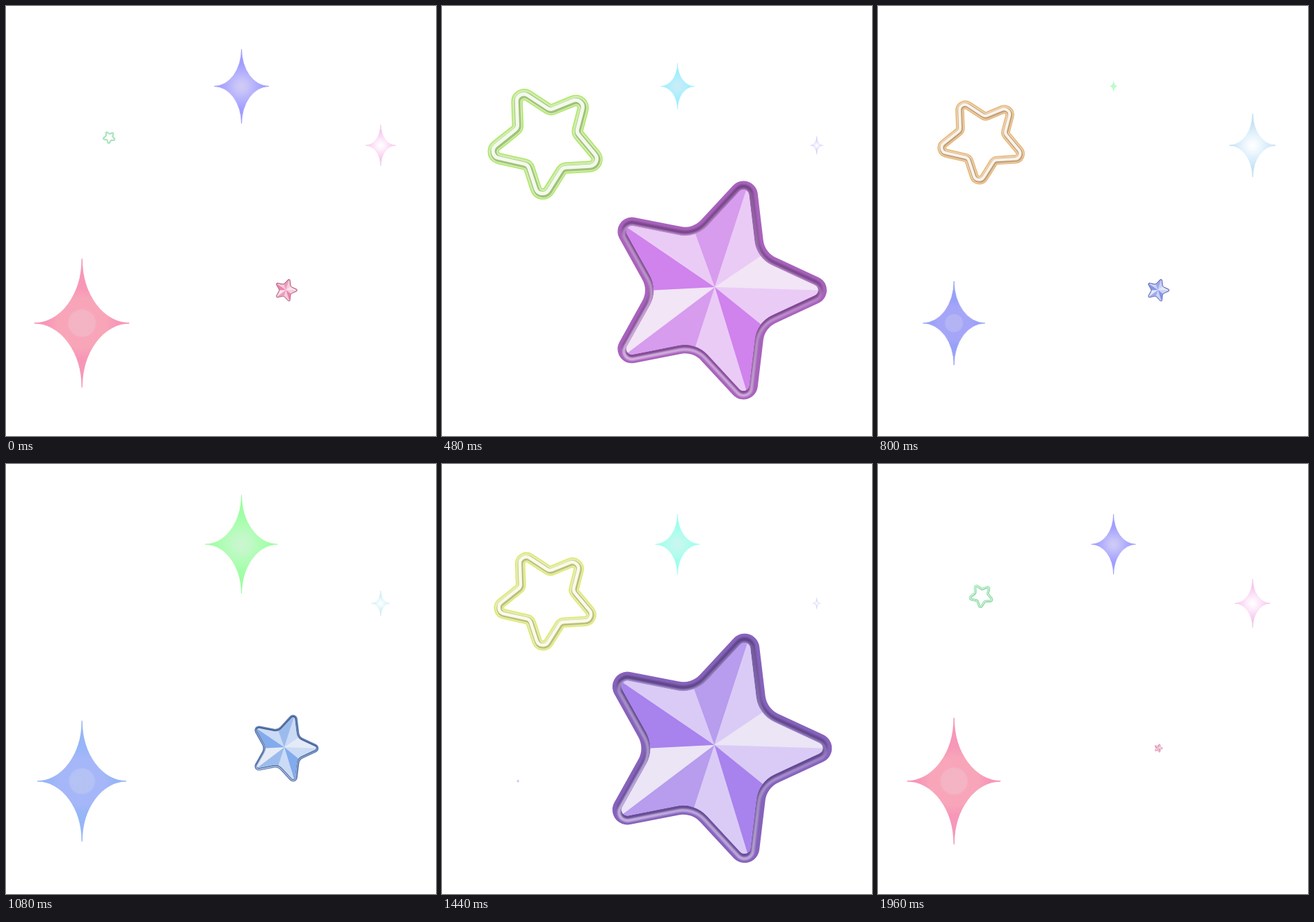
Recreate the animation shown at these times as an HTML page with a canvas. Size 618 by 618 pixels, loop 2 s.

```html
<!DOCTYPE html>
<html>
<head>
<meta charset="utf-8">
<title>Twinkling stars</title>
<style>
  html, body { margin: 0; width: 100%; height: 100%; overflow: hidden; background: #fff; }
  canvas { display: block; }
</style>
</head>
<body>
<canvas id="stage" width="618" height="618"></canvas>
<script>
const ctx = document.getElementById('stage').getContext('2d');
const LOOP = 2000, STEP = 40, PULSE = 1000, TAU = Math.PI * 2;

const hsl = (h, s, l, a = 1) => `hsla(${h}, ${s}%, ${l}%, ${a})`;

// Size between 0 and 1, largest at time `peak`
const pulse = (t, peak) => (1 + Math.cos(TAU * (t - peak) / PULSE)) / 2;

// Each gradient stop: position, hue offset, saturation, lightness
const SOFT = [[0, 4, 70, 88], [.15, 2, 78, 87], [.38, 0, 95, 84], [.6, 0, 100, 81], [1, 0, 100, 80]];
const ROSE = [[0, 0, 74, 83], [.2, 0, 74, 83], [.23, 0, 86, 81], [.38, 0, 86, 81], [.55, -6, 86, 78], [1, -6, 82, 78]];
const PALE = [[0, 0, 80, 100], [.15, 0, 80, 98], [.4, 0, 80, 93], [.7, 0, 68, 87], [1, 0, 60, 85]];

const sparkles = [
  { x: 338.5, y: 115.4, w: 60, h: 81.5, peak: 200, hue: 243, stops: SOFT },
  { x: 538.5, y: 200.3, w: 33, h: 45, peak: 800, hue: 310, stops: PALE },
  { x: 109.2, y: 455.8, w: 68, h: 92, peak: 0, hue: 346, stops: ROSE }
];

function drawSparkle(p, t, shift) {
  const size = pulse(t, p.peak);
  if (size < .003) return;
  const w = p.w * size, h = p.h * size;
  ctx.save();
  ctx.translate(p.x, p.y);
  ctx.beginPath();
  ctx.moveTo(w, 0);
  ctx.ellipse(w, h, w, h, 0, -TAU / 4, -TAU / 2, true);
  ctx.ellipse(-w, h, w, h, 0, 0, -TAU / 4, true);
  ctx.ellipse(-w, -h, w, h, 0, TAU / 4, 0, true);
  ctx.ellipse(w, -h, w, h, 0, TAU / 2, TAU / 4, true);
  const fill = ctx.createRadialGradient(0, 0, 0, 0, 0, h);
  for (const [at, dh, s, l] of p.stops) fill.addColorStop(at, hsl(p.hue + dh + shift, s, l));
  ctx.fillStyle = ctx.strokeStyle = fill;
  ctx.lineWidth = 1.4 * size;
  ctx.lineJoin = 'round';
  ctx.fill();
  ctx.stroke();
  ctx.restore();
}

const polar = (r, a) => [r * Math.cos(a), r * Math.sin(a)];

// Rounded five-pointed star, grown outwards by q
function starPath(q) {
  const tip = 143.5, notch = 69 + 1.146 * q, turn = 1.137;
  ctx.beginPath();
  for (let k = 0; k < 5; k++) {
    const a = k * TAU / 5, b = a + TAU / 5;
    const [x, y] = polar(tip, a), [nx, ny] = polar(tip, b), [ex, ey] = polar(q, b - turn);
    ctx.arc(x, y, q, a - turn, a + turn);
    ctx.arcTo(...polar(notch, a + TAU / 10), nx + ex, ny + ey, 52 - q);
  }
  ctx.closePath();
}

// Facet tones as saturation and lightness, clockwise from the right tip
const TONES = { strong: [75, 72], mid: [69, 77], light: [69, 88], pale: [48, 93] };
const FACETS = ['light', 'strong', 'light', 'mid', 'pale', 'strong', 'light', 'mid', 'light', 'pale'];

// Colour fading from alpha `from` at (x, y) to alpha `to` at the opposite point
function fade(x, y, h, s, l, from, to) {
  const g = ctx.createLinearGradient(x, y, -x, -y);
  g.addColorStop(0, hsl(h, s, l, from));
  g.addColorStop(1, hsl(h, s, l, to));
  return g;
}

function bevel(q, dy, width, paint, blur) {
  ctx.save();
  ctx.filter = `blur(${blur}px)`;
  ctx.translate(0, dy);
  starPath(q);
  ctx.lineWidth = width;
  ctx.strokeStyle = paint;
  ctx.stroke();
  ctx.restore();
}

function drawGem(t, shift) {
  const size = pulse(t, 400) / .938, hue = 336 + shift;
  if (size < .003) return;
  ctx.save();
  ctx.translate(403.5, 408.5);
  ctx.scale(size, size);
  ctx.translate(-14.5, 0);

  starPath(20.5);
  ctx.fillStyle = hsl(hue + 3, 40, 56);
  ctx.fill();
  bevel(11.5, -1.2, 5.5, fade(0, -150, hue, 33, 38, .9, .6), size);
  bevel(11.5, 3.2, 4.5, fade(90, -130, hue, 48, 86, .15, .85), size);

  starPath(8);
  ctx.clip();
  const cx = 3, cy = -4.5;
  const corner = k => {
    const [x, y] = polar(k % 2 ? 87 : 152, k * TAU / 10);
    return [2 * (x + 1.5) - cx, 2 * y - cy];
  };
  ctx.fillStyle = hsl(hue, ...TONES.light);
  ctx.fillRect(-200, -200, 400, 400);
  FACETS.forEach((tone, k) => {
    ctx.beginPath();
    ctx.moveTo(cx, cy);
    ctx.lineTo(...corner(k));
    ctx.lineTo(...corner(k + 1));
    ctx.fillStyle = hsl(hue, ...TONES[tone]);
    ctx.fill();
  });
  ctx.restore();
}

// Corners of the tube star, tips and notches alternating
const TUBE = [
  [100.5, 107], [157, 144], [217, 119.5], [201, 181], [247, 236],
  [178, 240], [141, 299], [120, 235], [47, 218.6], [103, 174]
];

function tubeStroke(dx, dy, width, color) {
  ctx.save();
  ctx.translate(dx, dy);
  ctx.beginPath();
  const [a, b] = [TUBE[9], TUBE[0]];
  ctx.moveTo((a[0] + b[0]) / 2, (a[1] + b[1]) / 2);
  TUBE.forEach((p, k) => ctx.arcTo(...p, ...TUBE[(k + 1) % 10], k % 2 ? 10 : 12));
  ctx.closePath();
  ctx.lineWidth = width;
  ctx.strokeStyle = color;
  ctx.stroke();
  ctx.restore();
}

function drawTube(t, shift) {
  const size = pulse(t, 600), hue = 140 + shift;
  if (size < .005) return;
  ctx.save();
  ctx.translate(148, 188);
  ctx.scale(size, size);
  ctx.translate(-148, -188);
  tubeStroke(0, 0, 19, hsl(hue, 75, 65));
  tubeStroke(0, 0, 15.5, hsl(hue, 60, 81));
  tubeStroke(.5, .8, 10, hsl(hue, 36, 62));
  tubeStroke(-.5, -.7, 6, hsl(hue, 60, 95));
  ctx.restore();
}

function frame(now) {
  const t = Math.floor((now % LOOP) / STEP) * STEP;
  const shift = -60 * (1 - Math.cos(TAU * (t - STEP / 2) / LOOP));
  ctx.clearRect(0, 0, 618, 618);
  drawTube(t, shift);
  for (const p of sparkles) drawSparkle(p, t, shift);
  drawGem(t, shift);
  requestAnimationFrame(loop);
}

let start;
function loop(now) {
  start ??= now;
  frame(Math.max(0, now - start));
}
frame(0);
</script>
</body>
</html>
```
